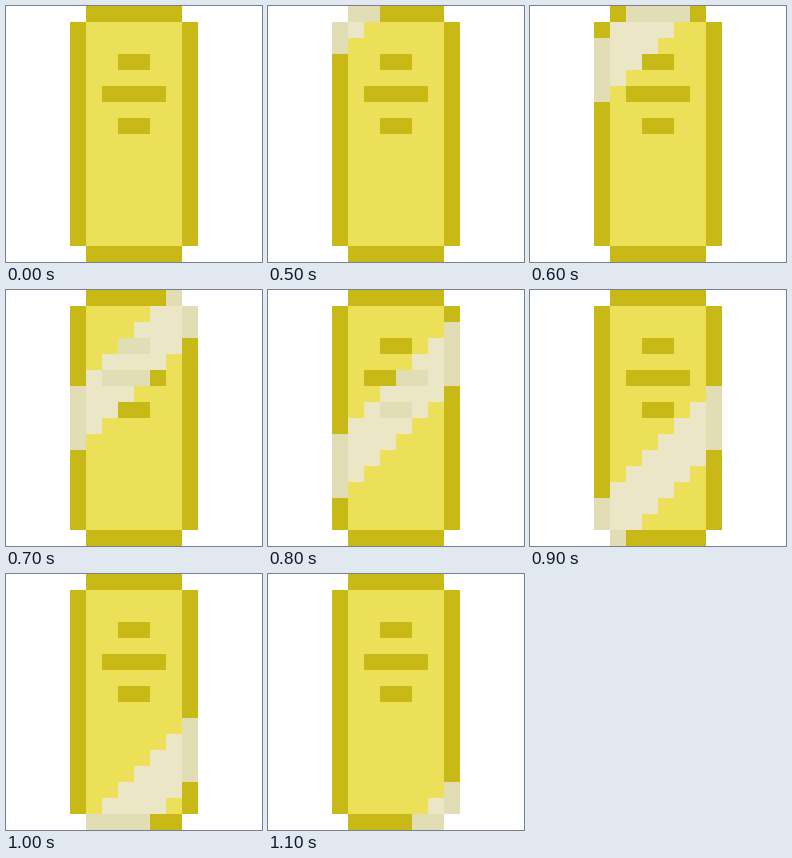
An HTML page with a canvas for the animation above (1200 ms loop, 256 px wide and 256 px high).

```html
<!DOCTYPE html>
<html lang="en">
<head>
<meta charset="utf-8">
<title>Shining bar</title>
<style>
  html, body { margin: 0; width: 100%; height: 100%; overflow: hidden; background: #fff; }
  canvas { display: block; }
</style>
</head>
<body>
<canvas id="stage" width="256" height="256"></canvas>
<script>
const ctx = document.getElementById('stage').getContext('2d');
const CELL = 16, LOOP = 1200, REST = 500, STEP = 100, BAND = 4;
const EDGE = '#c8b916', FACE = '#ece058';
const EDGE_SHINE = '#e1deb5', FACE_SHINE = '#ebe6c5';

function rect(color, x, y, w, h) {
  ctx.fillStyle = color;
  ctx.fillRect(x * CELL, y * CELL, w * CELL, h * CELL);
}

function drawBar(edge, face) {
  rect(edge, 5, 0, 6, 16);
  rect(edge, 4, 1, 8, 14);
  rect(face, 5, 1, 6, 14);
  rect(edge, 7, 3, 2, 1);
  rect(edge, 6, 5, 4, 1);
  rect(edge, 7, 7, 2, 1);
}

// Clips to the cells whose column + row lies within the diagonal band.
function clipBand(start) {
  ctx.beginPath();
  for (let row = 0; row < 16; row++) {
    ctx.rect((start - row) * CELL, row * CELL, BAND * CELL, CELL);
  }
  ctx.clip();
}

function draw(time) {
  ctx.clearRect(0, 0, 256, 256);
  drawBar(EDGE, FACE);
  if (time < REST) return;
  const step = Math.floor((time - REST) / STEP);
  ctx.save();
  clipBand(Math.floor(3 + 3.5 * step));
  drawBar(EDGE_SHINE, FACE_SHINE);
  ctx.restore();
}

const begin = performance.now();
function tick() {
  draw((performance.now() - begin) % LOOP);
  requestAnimationFrame(tick);
}
tick();
</script>
</body>
</html>
```
